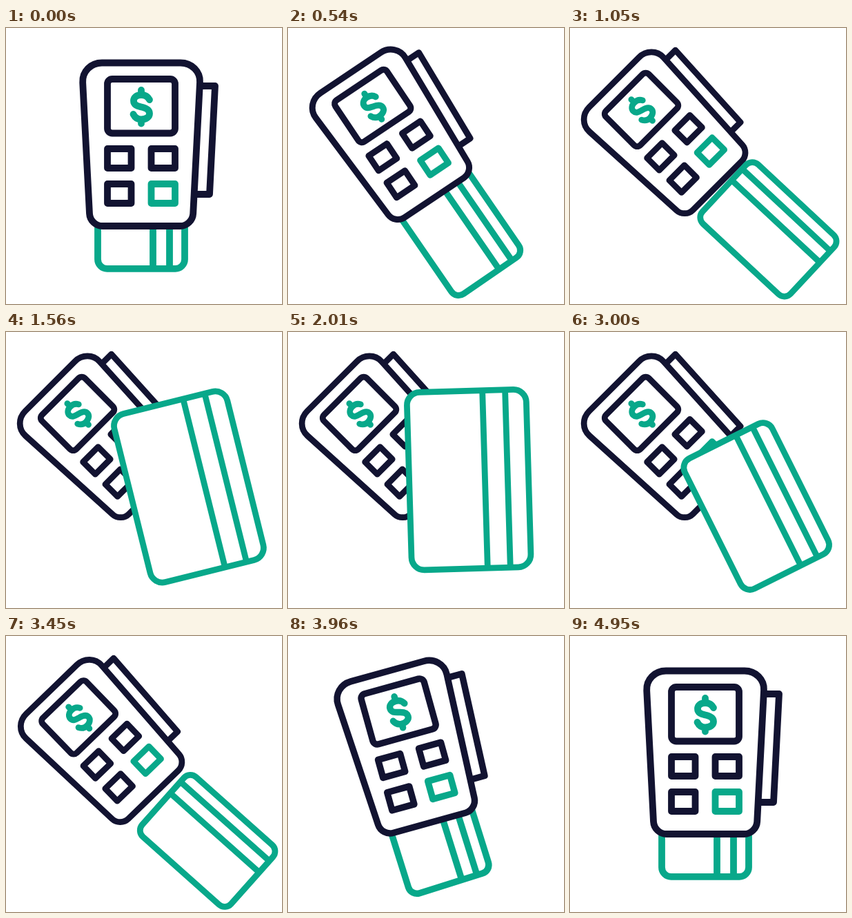
Recreate the animation shown at these times as an HTML page with a canvas. Size 400x400 px, loop 4.98 s.

```html
<!DOCTYPE html>
<html lang="en">
<head>
<meta charset="utf-8">
<title>Card payment terminal</title>
<style>
  html, body { margin: 0; width: 100%; height: 100%; overflow: hidden; background: #fff; }
  canvas { display: block; width: 400px; height: 400px; }
</style>
</head>
<body>
<canvas id="stage"></canvas>
<script>
const LOOP = 4980;
const NAVY = '#121331', TEAL = '#08a88a';
const PIVOT = { x: 196.25, y: 214.5 };
const STROKE = 9.8;

const canvas = document.getElementById('stage');
const ctx = canvas.getContext('2d');
const ratio = window.devicePixelRatio || 1;
canvas.width = canvas.height = 400 * ratio;

const body = new Path2D('M139 50.5H253C269 50.5 282 63 281 79L271.2 269C270.7 279 262 287 252.5 287H140C130 287 121.5 279 121 269L111.2 79C110.3 63 123 50.5 139 50.5Z');
const printer = new Path2D('M278 84H303L295 241H272');
const dollar = new Path2D('M208 104C205 98 200 97 196 97C189 97 185 101 185 105.5C185 112 191 113 196.5 114.5C203 116 208 118 208 124C208 129 203 132.5 196 132.5C191 132.5 187 130 184.5 125M196 90V97M196 132.5V138.5');
const display = roundRect(147, 74, 98, 78.5, 7);

// Card pose relative to the terminal: time, x, y, degrees, scale
const cardKeys = [
  [0, -0.25, 40.5, 0, 1],
  [400, 2, 76, -0.3, 1],
  [540, 3.2, 127.5, -0.7, 1.02],
  [800, 6, 178, -1.5, 1.02],
  [1050, 8, 181, -2, 1.04],
  [1300, 28, 156, 13, 1.28],
  [1560, 43.4, 110.1, 31, 1.497],
  [2350, 51, 97.1, 47, 1.543],
  [2650, 51, 97.1, 47, 1.543],
  [3240, 11, 171, -1, 1.06],
  [3450, 11, 187, -4.3, 1.025],
  [3650, 10.5, 172, -4, 1.02],
  [3810, 7, 139, -2.5, 1.01],
  [3960, 3.7, 75.2, -1.9, 1],
  [4350, -0.25, 40.5, 0, 1],
  [LOOP, -0.25, 40.5, 0, 1]
];

function roundRect(x, y, w, h, r) {
  const p = new Path2D();
  p.moveTo(x + r, y);
  p.arcTo(x + w, y, x + w, y + h, r);
  p.arcTo(x + w, y + h, x, y + h, r);
  p.arcTo(x, y + h, x, y, r);
  p.arcTo(x, y, x + w, y, r);
  p.closePath();
  return p;
}

// Ease with handles (x1, 0) and (x2, 1)
function ease(u, x1, x2) {
  if (u <= 0) return 0;
  if (u >= 1) return 1;
  let lo = 0, hi = 1, s;
  for (let i = 0; i < 30; i++) {
    s = (lo + hi) / 2;
    const x = 3 * x1 * s * (1 - s) ** 2 + 3 * x2 * s * s * (1 - s) + s ** 3;
    if (x < u) lo = s; else hi = s;
  }
  return s * s * (3 - 2 * s);
}

function tilt(t) {
  return t < 3212
    ? ease(t / 1054, 0.65, 0.15)
    : 1 - ease((t - 3212) / 1220, 0.85, 0.35);
}

function slope(i, c) {
  if (i === 0 || i === cardKeys.length - 1) return 0;
  const [a, b, d] = [cardKeys[i - 1], cardKeys[i], cardKeys[i + 1]];
  const before = (b[c] - a[c]) / (b[0] - a[0]);
  const after = (d[c] - b[c]) / (d[0] - b[0]);
  return before * after <= 0 ? 0 : 2 * before * after / (before + after);
}

// Monotone cubic through the pose table
function cardPose(t) {
  let i = 0;
  while (i < cardKeys.length - 2 && t >= cardKeys[i + 1][0]) i++;
  const a = cardKeys[i], b = cardKeys[i + 1];
  const span = b[0] - a[0], u = (t - a[0]) / span, v = 1 - u;
  return [1, 2, 3, 4].map(c =>
    a[c] * v * v * (1 + 2 * u) + b[c] * u * u * (3 - 2 * u) +
    span * u * v * (v * slope(i, c) - u * slope(i + 1, c)));
}

function shape(path, color, fill) {
  if (fill) {
    ctx.fillStyle = '#fff';
    ctx.fill(path);
  }
  ctx.strokeStyle = color;
  ctx.stroke(path);
}

function drawTerminal() {
  shape(printer, NAVY);
  shape(body, NAVY, true);
  shape(display, NAVY);
  shape(dollar, TEAL);
  for (const y of [175, 226]) {
    for (const x of [147, 210.5]) {
      const key = new Path2D();
      key.rect(x, y, 34.5, 28);
      shape(key, x > 200 && y > 200 ? TEAL : NAVY);
    }
  }
}

function drawCard(t) {
  const [x, y, deg, s] = cardPose(t);
  const w = 126 * s, h = 187.6 * s;
  const card = roundRect(-w / 2, -h / 2, w, h, 13.5 * s);
  for (const stripe of [17, 41]) {
    card.moveTo(stripe * s, -h / 2);
    card.lineTo(stripe * s, h / 2);
  }
  ctx.save();
  ctx.translate(PIVOT.x + x, PIVOT.y + y);
  ctx.rotate(deg * Math.PI / 180);
  ctx.lineCap = 'butt';
  shape(card, TEAL, true);
  ctx.restore();
}

function draw(t) {
  const p = tilt(t), k = 1 - 0.105 * p;
  ctx.setTransform(ratio, 0, 0, ratio, 0, 0);
  ctx.fillStyle = '#fff';
  ctx.fillRect(0, 0, 400, 400);
  ctx.translate(PIVOT.x - 28.45 * p, PIVOT.y - 32.2 * p);
  ctx.rotate(-p * Math.PI / 4);
  ctx.scale(k, k);
  ctx.translate(-PIVOT.x, -PIVOT.y);
  ctx.lineWidth = STROKE;
  ctx.lineJoin = ctx.lineCap = 'round';

  const cardInFront = t > 1000 && t < 3350;
  if (!cardInFront) drawCard(t);
  drawTerminal();
  if (cardInFront) drawCard(t);
}

const start = performance.now();
function tick() {
  draw((performance.now() - start) % LOOP);
  requestAnimationFrame(tick);
}
tick();
</script>
</body>
</html>
```
